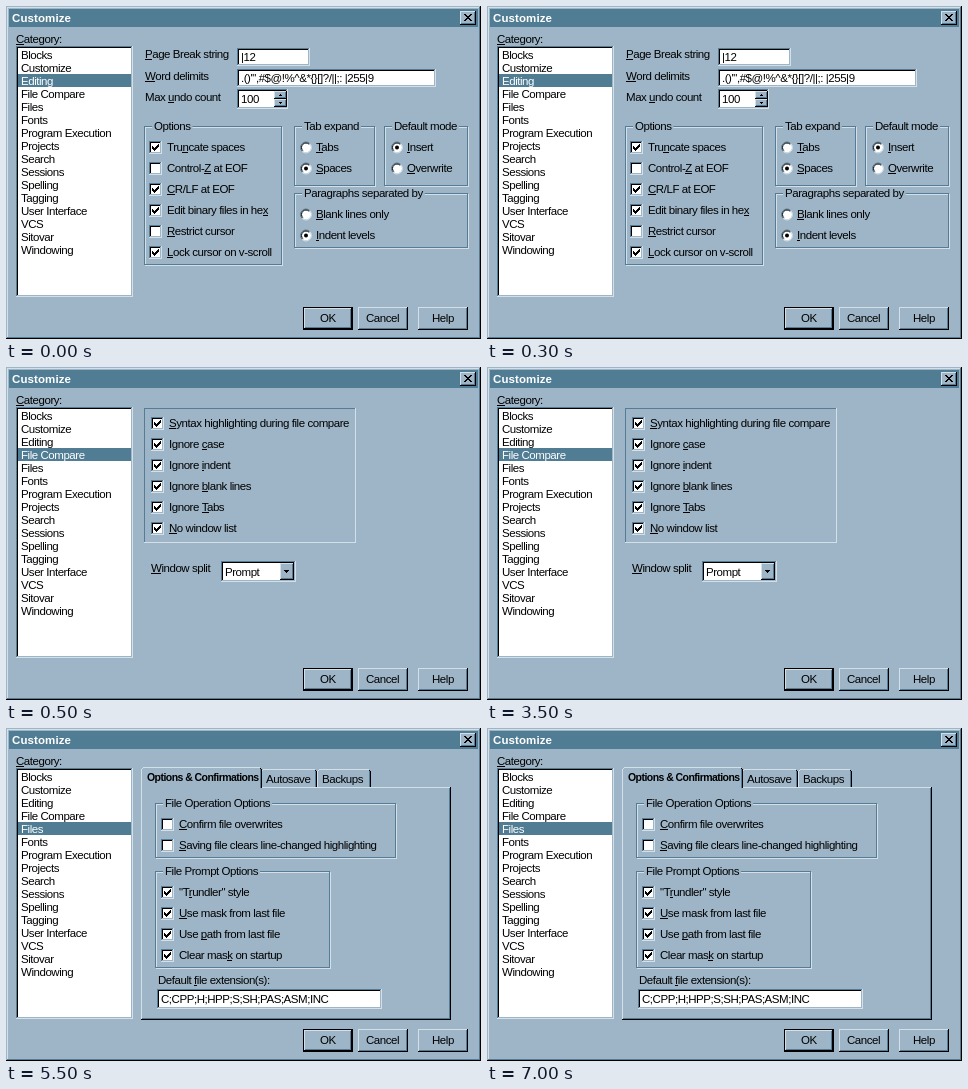
Recreate the animation shown at these times as an HTML page with a canvas. Size 475 by 333 pixels, loop 8 s.

```html
<!DOCTYPE html>
<html lang="en">
<head>
<meta charset="utf-8">
<title>Customize</title>
<style>
html, body { margin: 0; width: 100%; height: 100%; overflow: hidden; background: #9db5c6; }
canvas { display: block; }
</style>
</head>
<body>
<canvas id="stage" width="475" height="333"></canvas>
<script>
const ctx = document.getElementById('stage').getContext('2d');
const FACE = '#9db5c6', LIGHT = '#d3e0e8', SHADOW = '#557c94', BLACK = '#000', WHITE = '#fff';
const ACCENT = '#507c94';
const FAMILY = '"Liberation Sans", Arial, sans-serif';
const PLAIN = { font: '11.5px ' + FAMILY, spacing: -0.45 };
const HEADING = { font: 'bold 11.5px ' + FAMILY, spacing: 0.1 };
const TAB_BOLD = { font: 'bold 10.5px ' + FAMILY, spacing: -0.55 };

const CATEGORIES = ['Blocks', 'Customize', 'Editing', 'File Compare', 'Files', 'Fonts',
  'Program Execution', 'Projects', 'Search', 'Sessions', 'Spelling', 'Tagging',
  'User Interface', 'VCS', 'Sitovar', 'Windowing'];

function rect(x, y, w, h, color) {
  ctx.fillStyle = color;
  ctx.fillRect(x, y, w, h);
}

// One-pixel frame with separate top-left and bottom-right colours.
function edge(x, y, w, h, tl, br) {
  rect(x, y, w, 1, tl);
  rect(x, y, 1, h, tl);
  rect(x, y + h - 1, w, 1, br);
  rect(x + w - 1, y, 1, h, br);
}

function textWidth(label, style = PLAIN) {
  ctx.font = style.font;
  ctx.letterSpacing = style.spacing + 'px';
  return ctx.measureText(label.replace('_', '')).width;
}

// An underscore marks the access key that follows it.
function text(label, x, y, color = BLACK, style = PLAIN) {
  const key = label.indexOf('_');
  const plain = label.replace('_', '');
  ctx.font = style.font;
  ctx.letterSpacing = style.spacing + 'px';
  ctx.fillStyle = color;
  ctx.fillText(plain, x, y);
  if (key >= 0) {
    const left = Math.round(x + textWidth(plain.slice(0, key), style));
    rect(left, y + 1, Math.round(textWidth(plain[key], style)), 1, color);
  }
}

function raised(x, y, w, h) {
  rect(x, y, w, h, FACE);
  edge(x, y, w, h, LIGHT, BLACK);
  edge(x + 1, y + 1, w - 2, h - 2, FACE, SHADOW);
}

function sunken(x, y, w, h) {
  rect(x, y, w, h, WHITE);
  edge(x, y, w, h, SHADOW, LIGHT);
  edge(x + 1, y + 1, w - 2, h - 2, BLACK, FACE);
}

function field(value, x, y, w, h) {
  sunken(x, y, w, h);
  text(value, x + 4, y + h / 2 + 4);
}

function group(x, y, w, h, label) {
  edge(x + 1, y + 1, w - 1, h - 1, LIGHT, LIGHT);
  edge(x, y, w - 1, h - 1, SHADOW, SHADOW);
  rect(x + 8, y, textWidth(label) + 4, 2, FACE);
  text(label, x + 10, y + 4);
}

function check(label, x, cy, on) {
  sunken(x, cy - 6, 13, 13);
  if (on) {
    for (let i = 0; i < 7; i++) rect(x + 3 + i, cy - 1 + (i < 3 ? i : 4 - i), 1, 3, BLACK);
  }
  text(label, x + 18, cy + 4);
}

function arc(x, y, r, from, to, color) {
  ctx.strokeStyle = color;
  ctx.lineWidth = 1;
  ctx.beginPath();
  ctx.arc(x, y, r, from * Math.PI, to * Math.PI);
  ctx.stroke();
}

function disc(x, y, r, color) {
  ctx.fillStyle = color;
  ctx.beginPath();
  ctx.arc(x, y, r, 0, 2 * Math.PI);
  ctx.fill();
}

function radio(label, x, cy, on) {
  const mx = x + 6, my = cy + 0.5;
  disc(mx, my, 5, WHITE);
  arc(mx, my, 5.5, 0.75, 1.75, SHADOW);
  arc(mx, my, 5.5, -0.25, 0.75, LIGHT);
  arc(mx, my, 4.5, 0.75, 1.75, BLACK);
  if (on) disc(mx, my, 2, BLACK);
  text(label, x + 16, cy + 4);
}

function arrow(cx, y, size, down) {
  for (let i = 0; i < size; i++) {
    const half = down ? size - 1 - i : i;
    rect(cx - half, y + i, half * 2 + 1, 1, BLACK);
  }
}

function button(label, x, y, w, isDefault) {
  if (isDefault) {
    rect(x, y, w, 23, BLACK);
    raised(x + 1, y + 1, w - 2, 21);
  } else {
    raised(x, y, w, 23);
  }
  text(label, x + Math.round((w - textWidth(label)) / 2), y + 15);
}

function drawWindow(selected) {
  rect(0, 0, 475, 333, FACE);
  edge(0, 0, 475, 333, FACE, BLACK);
  edge(1, 1, 473, 331, LIGHT, SHADOW);
  rect(3, 3, 469, 18, ACCENT);
  text('Customize', 6, 16, WHITE, HEADING);
  raised(454, 5, 16, 14);
  for (let i = 0; i < 7; i++) {
    rect(458 + i, 8 + i, 2, 1, BLACK);
    rect(464 - i, 8 + i, 2, 1, BLACK);
  }

  text('_Category:', 10, 37);
  sunken(10, 40, 117, 251);
  CATEGORIES.forEach((name, i) => {
    const y = 42 + 13 * i;
    if (i === selected) rect(12, y, 113, 13, ACCENT);
    text(name, 15, y + 11, i === selected ? WHITE : BLACK);
  });

  button('OK', 297, 301, 50, true);
  button('Cancel', 352, 301, 50);
  button('Help', 412, 301, 50);
}

function editingPage() {
  text('_Page Break string', 139, 52);
  text('_Word delimits', 139, 74);
  text('Max _undo count', 139, 95);
  field('|12', 231, 42, 73, 18);
  field('.()\'",#$@!%^&*{}[]?/||;: |255|9', 231, 63, 199, 18);
  field('100', 231, 83, 51, 20);
  raised(268, 85, 13, 8);
  raised(268, 93, 13, 8);
  arrow(274, 88, 2, false);
  arrow(274, 96, 2, true);

  group(138, 120, 139, 140, 'Options');
  check('Tru_ncate spaces', 143, 141, true);
  check('Control-_Z at EOF', 143, 162, false);
  check('_CR/LF at EOF', 143, 183, true);
  check('Edit binary files in he_x', 143, 204, true);
  check('_Restrict cursor', 143, 225, false);
  check('_Lock cursor on v-scroll', 143, 246, true);

  group(288, 120, 82, 61, 'Tab expand');
  radio('_Tabs', 294, 141, false);
  radio('_Spaces', 294, 162, true);

  group(378, 120, 85, 61, 'Default mode');
  radio('_Insert', 385, 141, true);
  radio('_Overwrite', 385, 162, false);

  group(288, 187, 175, 56, 'Paragraphs separated by');
  radio('_Blank lines only', 294, 208, false);
  radio('_Indent levels', 294, 229, true);
}

function comparePage() {
  edge(138, 41, 212, 135, SHADOW, LIGHT);
  ['_Syntax highlighting during file compare', 'Ignore _case', 'Ignore _indent',
    'Ignore _blank lines', 'Ignore _Tabs', '_No window list']
    .forEach((label, i) => check(label, 145, 56 + 21 * i, true));

  text('_Window split', 145, 205);
  sunken(215, 194, 75, 21);
  text('Prompt', 219, 209);
  raised(274, 196, 14, 17);
  arrow(280, 203, 3, true);
}

function tab(x, y, w, h) {
  rect(x, y, w, h, FACE);
  rect(x, y + 2, 1, h - 2, LIGHT);
  rect(x + 1, y + 1, 1, 1, LIGHT);
  rect(x + 2, y, w - 4, 1, LIGHT);
  rect(x + w - 2, y + 2, 1, h - 2, SHADOW);
  rect(x + w - 2, y + 1, 1, 1, BLACK);
  rect(x + w - 1, y + 2, 1, h - 2, BLACK);
}

function filesPage() {
  raised(135, 59, 310, 233);
  tab(255, 41, 56, 18);
  tab(311, 41, 54, 18);
  tab(135, 39, 121, 21);
  text('Options & Confirmations', 141, 53, BLACK, TAB_BOLD);
  text('Autosave', 260, 55);
  text('Backups', 316, 55);

  group(149, 75, 242, 56, 'File Operation Options');
  check('_Confirm file overwrites', 155, 96, false);
  check('_Saving file clears line-changed highlighting', 155, 117, false);

  group(149, 143, 176, 98, 'File Prompt Options');
  ['"T_rundler" style', '_Use mask from last file', 'Use _path from last file',
    'Clear mas_k on startup']
    .forEach((label, i) => check(label, 155, 164 + 21 * i, true));

  text('Default _file extension(s):', 152, 256);
  field('C;CPP;H;HPP;S;SH;PAS;ASM;INC', 151, 261, 225, 20);
}

const SCENES = [
  { until: 500, selected: 2, page: editingPage },
  { until: 5500, selected: 3, page: comparePage },
  { until: 8000, selected: 4, page: filesPage }
];

const start = performance.now();
function draw() {
  const time = (performance.now() - start) % 8000;
  const scene = SCENES.find(s => time < s.until);
  drawWindow(scene.selected);
  scene.page();
  requestAnimationFrame(draw);
}
draw();
</script>
</body>
</html>
```
